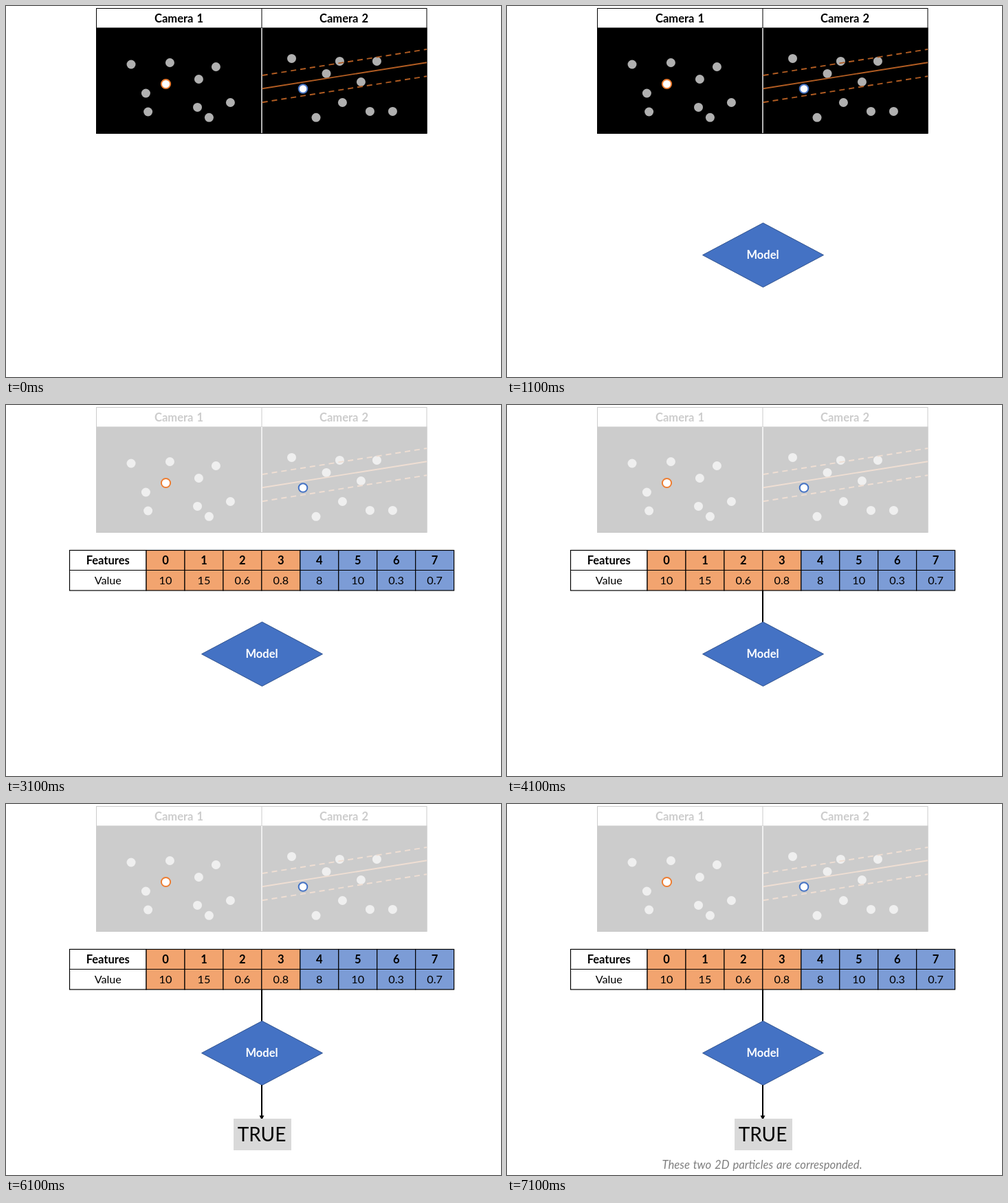
Animation of 720x540 px, one loop 8 s. Source, as an HTML page:

```html
<!DOCTYPE html>
<html lang="en">
<head>
<meta charset="utf-8">
<style>
  html, body { margin: 0; width: 100%; height: 100%; overflow: hidden; background: #fff; }
  svg { display: block; width: 720px; height: 540px; }
  text { font: 16.2px Lato, Carlito, sans-serif; text-anchor: middle; word-spacing: 1px; }
  .bold { font-weight: 700; font-size: 16.5px; }
  .true { font-size: 28px; }
  .note { font-style: italic; font-size: 16.7px; fill: #7f7f7f; }
  .dot { fill: #b0b0b0; }
  .epipolar { stroke: #b15c22; stroke-width: 1.9; }
  .step { visibility: hidden; }
</style>
</head>
<body>
<svg viewBox="0 0 720 540">
  <g id="cameras">
    <rect x="131.5" y="3.5" width="480.5" height="182" fill="#fff" stroke="#000"/>
    <rect x="131" y="31.5" width="481.5" height="154"/>
    <path d="M372 3V32" stroke="#000"/>
    <path d="M372 32V185" stroke="#fff" stroke-width="1.4"/>
    <text class="bold" x="251.5" y="24">Camera 1</text>
    <text class="bold" x="491.5" y="24">Camera 2</text>
    <g id="dots"></g>
    <path class="epipolar" d="M372.7 120.2L612 82.2"/>
    <path class="epipolar" stroke-dasharray="8 6" d="M372.7 101L612 63M372.7 140.2L612 102.2"/>
  </g>
  <rect class="step" data-at="2100" x="130" y="2" width="484" height="185" fill="#fff" opacity=".8"/>
  <g fill="#fff" stroke-width="2">
    <circle cx="232.5" cy="113.5" r="6.6" stroke="#ed7d31"/>
    <circle cx="432" cy="120.5" r="6.3" stroke="#4472c4"/>
  </g>

  <g class="step" data-at="3100" id="table"></g>
  <path class="step" data-at="4100" d="M372 270V316" stroke="#000" stroke-width="2"/>
  <g class="step" data-at="1100">
    <path d="M284.5 362.5L372.5 315.8L460.5 362.5L372.5 409.3Z" fill="#4472c4" stroke="#2f528f"/>
    <text class="bold" x="372" y="368" fill="#fff">Model</text>
  </g>
  <g class="step" data-at="5100">
    <path d="M372 409V455" stroke="#000" stroke-width="2"/>
    <path d="M368.6 453.5H375.4L372 460Z"/>
  </g>
  <g class="step" data-at="6100">
    <rect x="331" y="458" width="84" height="46" fill="#d9d9d9"/>
    <text class="true" x="372" y="491">TRUE</text>
  </g>
  <text class="step note" data-at="7100" x="371" y="531">These two 2D particles are corresponded.</text>
</svg>
<script>
  const LOOP = 8000;
  const particles = [
    [182, 85], [238.4, 82.5], [305.4, 88.5], [280.4, 106.5], [203.4, 127],
    [206.6, 154], [278.5, 147.4], [326.4, 140.5], [295.4, 162.3],
    [415.5, 76.4], [485.4, 80.4], [539.4, 80.4], [466, 98.4], [516.4, 110.5],
    [489.4, 140.5], [451, 162.3], [529.4, 153.4], [562.4, 153.4]
  ];
  document.getElementById('dots').innerHTML = particles
    .map(([x, y]) => `<circle class="dot" cx="${x}" cy="${y}" r="6.5"/>`).join('');

  const values = ['10', '15', '0.6', '0.8', '8', '10', '0.3', '0.7'];
  const columnX = i => 204 + 55.95 * i;
  const column = (x, width, fill, head, value) => `
    <rect x="${x}" y="211.5" width="${width}" height="58.5" fill="${fill}" stroke="#000" stroke-width="1.2"/>
    <text class="bold" x="${x + width / 2}" y="232">${head}</text>
    <text x="${x + width / 2}" y="261">${value}</text>`;
  document.getElementById('table').innerHTML =
    column(92.5, 111.5, '#fff', 'Features', 'Value') +
    values.map((v, i) => column(columnX(i), 55.95, i < 4 ? '#f2a46f' : '#7c9cd6', i, v)).join('') +
    '<path d="M92 240.5H652" stroke="#000" stroke-width="1.2"/>';

  const steps = document.querySelectorAll('.step');
  const start = performance.now();
  function draw() {
    const time = (performance.now() - start) % LOOP;
    for (const step of steps)
      step.style.visibility = time >= +step.dataset.at ? 'visible' : 'hidden';
    requestAnimationFrame(draw);
  }
  draw();
</script>
</body>
</html>
```
